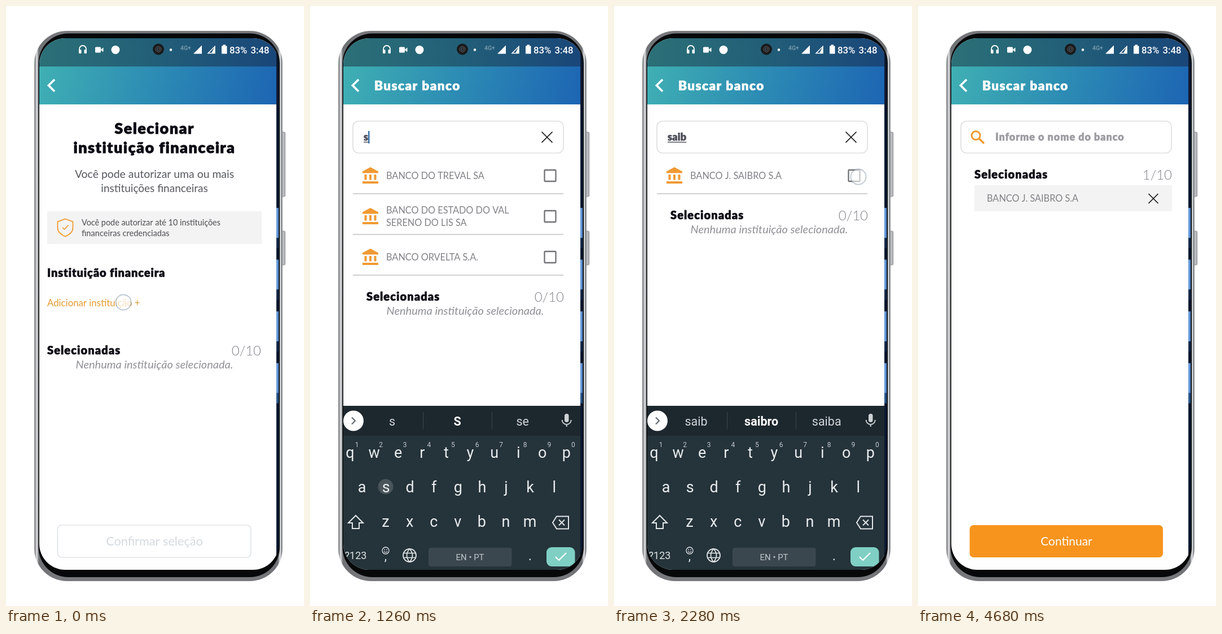
An HTML page with a canvas for the animation above (4710 ms loop, 528 by 1061 pixels).

```html
<!DOCTYPE html>
<html lang="pt">
<head>
<meta charset="utf-8">
<title>Selecionar instituição</title>
<style>
html, body { margin: 0; width: 100%; height: 100%; overflow: hidden; background: #fff; }
canvas { display: block; }
</style>
</head>
<body>
<canvas id="stage" width="528" height="1061"></canvas>
<script>
const ctx = document.getElementById('stage').getContext('2d');
const LOOP = 4710;
const ORANGE = '#f7941d';
const INK = '#0b0b14';
const LATO = 'Lato, "Open Sans", sans-serif';
const ROBOTO = 'Roboto, "Open Sans", sans-serif';
const SLIDE = { start: 300, time: 250, width: 432 };
const KEYS_UP = 830, CLEAR = 3900, KEYS_TIME = 175;
const CHECKED = 2430, ROW_GONE = 2560, LAST_KEY = 1780;

const TYPING = [[1240, 's'], [1440, 'sa'], [1620, 'sai'], [LAST_KEY, 'saib'], [CLEAR, '']];
const HINTS = {
  s: ['s', 'S', 'se'],
  sa: ['sa', 'SA', 'sabe'],
  sai: ['sai', 'saiu', 'saiba'],
  saib: ['saib', 'saibro', 'saiba']
};
const PICK = 'BANCO J. SAIBRO S.A';
const BANKS = [
  ['BANCO DO TREVAL SA'],
  ['BANCO DO ESTADO DO VAL', 'SERENO DO LIS SA'],
  ['BANCO ORVELTA S.A.']
];
// x, y, start, end, fill strength
const TAPS = [
  [208, 524, -120, 280, .7], [350, 235, 660, 960, .5],
  [134, 850, 1180, 1340, .25], [77, 850, 1400, 1640, .25],
  [369, 790, 1570, 1720, .25], [305, 912, 1730, 1890, .25],
  [433, 302, 2160, 2440, .6], [420, 232, 3740, 3960, .6]
];

const clamp = v => Math.max(0, Math.min(1, v));

function text(str, x, y, size, color, o = {}) {
  ctx.font = `${o.style || 'normal'} ${o.weight || 400} ${size}px ${o.font || LATO}`;
  ctx.letterSpacing = (o.gap || 0) + 'px';
  ctx.textAlign = o.align || 'left';
  ctx.fillStyle = color;
  ctx.fillText(str, x, y);
  if (o.weight === 900) {
    ctx.strokeStyle = color;
    ctx.lineWidth = size * .03;
    ctx.lineJoin = 'round';
    ctx.strokeText(str, x, y);
    ctx.lineJoin = 'miter';
  }
  const w = ctx.measureText(str).width;
  ctx.letterSpacing = '0px';
  return w;
}

function rect(x, y, w, h, color) {
  ctx.fillStyle = color;
  ctx.fillRect(x, y, w, h);
}

function box(x, y, w, h, r, fill, stroke, line = 1.2) {
  ctx.beginPath();
  ctx.roundRect(x, y, w, h, r);
  paint(fill, stroke, line);
}

function disc(x, y, r, fill, stroke, line = 1.2) {
  ctx.beginPath();
  ctx.arc(x, y, r, 0, Math.PI * 2);
  paint(fill, stroke, line);
}

function paint(fill, stroke, line) {
  if (fill) { ctx.fillStyle = fill; ctx.fill(); }
  if (stroke) { ctx.strokeStyle = stroke; ctx.lineWidth = line; ctx.stroke(); }
}

function shape(d, x, y, fill, stroke, line = 2) {
  ctx.save();
  ctx.translate(x, y);
  const p = new Path2D(d);
  if (fill) { ctx.fillStyle = fill; ctx.fill(p); }
  if (stroke) { ctx.strokeStyle = stroke; ctx.lineWidth = line; ctx.stroke(p); }
  ctx.restore();
}

function cross(x, y, r) {
  shape(`M${-r} ${-r}L${r} ${r}M${r} ${-r}L${-r} ${r}`, x, y, null, '#111', 1.7);
}

function ramp(x0, y0, x1, y1, ...colors) {
  const g = ctx.createLinearGradient(x0, y0, x1, y1);
  colors.forEach((c, i) => g.addColorStop(i / (colors.length - 1), c));
  return g;
}

function header(title) {
  rect(47, 57, 432, 940, '#fff');
  rect(47, 107, 432, 67, ramp(60, 90, 465, 200, '#40b0b3', '#2c8bb4', '#1d66b3'));
  shape('M6 -10.5L-4.5 0L6 10.5', 80, 140.5, null, '#fff', 3.8);
  if (title) text(title, 114, 149, 22.5, '#fff', { weight: 900, gap: 1.45 });
}

function button(label, size, on) {
  box(91.5, 918, 342.5, 57, 7, on ? ORANGE : null, on ? null : '#d3dae0');
  text(label, 263, 954, size, on ? '#fff' : '#d4dadf', { align: 'center' });
}

function selected(x, right, mid, y, count) {
  text('Selecionadas', x, y + 7, 20, INK, { weight: 900, gap: 1.1 });
  text(count + '/10', right, y + 9, 24, '#7f8288', { weight: 300, align: 'right' });
  if (!count) {
    text('Nenhuma instituição selecionada.', mid, y + 32, 20, '#8f9195',
      { style: 'italic', align: 'center' });
    return;
  }
  rect(x, y + 19, right - x, 46, '#f4f3f3');
  text(PICK, x + 22, y + 48, 16.3, '#808286');
  cross(417, y + 42.5, 8.5);
}

function startPage() {
  header();
  const head = { weight: 900, gap: 1.45, align: 'center' }, mid = { align: 'center' };
  text('Selecionar', 263, 226, 27, INK, head);
  text('instituição financeira', 263, 260, 27, INK, head);
  text('Você pode autorizar uma ou mais', 263, 304, 19.4, '#55585d', mid);
  text('instituições financeiras', 263, 329, 19, '#55585d', mid);
  rect(73, 363, 380, 58, '#f4f3f3');
  shape('M0 -15L13.5 -10V1C13.5 8 7 13 0 16C-7 13 -13.5 8 -13.5 1V-10Z', 105, 391.5, null, '#ee9a30', 1.8);
  shape('M-5 0L-1.5 3.5L5.5 -4', 105, 391.5, null, '#ee9a30', 1.6);
  text('Você pode autorizar até 10 instituições', 134, 388, 14.4, '#4c4e52');
  text('financeiras credenciadas', 134, 407, 14.6, '#4c4e52');
  text('Instituição financeira', 73, 479, 20, INK, { weight: 900, gap: .9 });
  text('Adicionar instituição +', 73, 531, 16.8, '#e39a32');
  selected(73, 452, 263, 609, 0);
  button('Confirmar seleção', 21.7, false);
}

function bankRow(lines, y, checked) {
  shape('M0 -15L14 -7.5V-4.5H-14V-7.5ZM-10.5 -2H-6.5V7.5H-10.5ZM-2 -2H2V7.5H-2ZM6.5 -2H10.5V7.5H6.5ZM-14 10H14V14H-14Z',
    107, y, '#f19a33');
  lines.forEach((s, i) =>
    text(s, 135, y + 6 + (i - (lines.length - 1) / 2) * 22, 16.3, '#808286'));
  box(415.5, y - 10, 20, 20, 1, checked ? ORANGE : null, checked ? ORANGE : '#707276', 2.3);
  if (checked) shape('M-6 0L-2 4L6 -5', 425.5, y, null, '#fff', 2.4);
  rect(76, y + 31.3, 373, 1.3, '#b7b8ba');
}

function searchPage(t, typed) {
  header('Buscar banco');
  box(76, 203.5, 373, 56.5, 10, '#fff', '#cfd1d3');
  let caret = 138;
  if (typed) {
    const w = text(typed, 95, 238, 18, '#4b4d57', { weight: 900, gap: .2 });
    rect(95, 240, w, 1.4, '#4b4d57');
    caret = 96 + w;
    cross(420, 232, 9.5);
  } else {
    disc(102.5, 229, 7.5, null, '#ee9a30', 3);
    shape('M0 0L9 9', 108, 234, null, '#ee9a30', 3.4);
    text('Informe o nome do banco', 137, 238, 18, '#9c9da2', { weight: 900, gap: .95 });
  }
  const blinkOn = t < LAST_KEY || Math.floor((t - LAST_KEY) / 500) % 2 === 0;
  if (t < CLEAR && blinkOn) rect(caret - 1, 221, 2.2, 22, '#1f5f9e');

  const picked = t >= CHECKED;
  let rows = 0;
  if (typed.length > 2) {
    rows = 1;
    if (t < ROW_GONE) bankRow([PICK], 300, picked);
  } else if (typed) {
    rows = 3;
    BANKS.forEach((b, i) => bankRow(b, 300 + i * 72, false));
  }
  selected(100, 450, 275, 298 + rows * 72, picked ? 1 : 0);
  button('Continuar', 20.9, picked);
}

function tools() {
  const c = '#e4e8ea';
  box(123, 725, 18, 18, 3, null, c, 2);
  disc(128.5, 731, 1.3, c);
  disc(135.5, 731, 1.3, c);
  shape('M-5 2Q0 8 5 2', 132, 734, null, c, 1.8);
  text('GIF', 193, 739, 15, c, { weight: 700, font: ROBOTO, gap: 1, align: 'center' });
  for (let i = 0; i < 8; i++) {
    const a = i * Math.PI / 4;
    disc(255 + 7.5 * Math.cos(a), 734 + 7.5 * Math.sin(a), 2.6, c);
  }
  disc(255, 734, 5.5, null, c, 4.5);
  box(307, 724, 14, 15, 2, c);
  box(313, 730, 14, 15, 2, null, c, 1.6);
  text('G', 314, 737, 11, '#7b8488', { weight: 700, font: ROBOTO, align: 'center' });
  rect(353.5, 720, 1, 27, 'rgba(255,255,255,.12)');
  for (let i = -1; i < 2; i++) disc(393 + i * 8, 734, 2.4, c);
}

function keyRow(letters, x, y, digits) {
  [...letters].forEach((k, i) => {
    const cx = x + i * 42.6;
    text(k, cx, y, 27, '#e9edef', { font: ROBOTO, align: 'center' });
    if (digits) text((i + 1) % 10, cx + 12, y - 19, 12, '#c3cace', { font: ROBOTO, align: 'center' });
  });
}

function keyboard(t, typed) {
  const up = t < CLEAR ? clamp((t - KEYS_UP) / KEYS_TIME) : 1 - clamp((t - CLEAR) / KEYS_TIME);
  if (!up) return;
  const c = '#e1e6e8', mid = { font: ROBOTO, align: 'center' };
  ctx.save();
  ctx.translate(0, (1 - up) * 157);
  // the backing fades in, the keys stay solid
  ctx.globalAlpha = Math.min(1, up * 1.35);
  rect(47, 707, 432, 53, '#1d272e');
  rect(47, 760, 432, 400, '#25333a');
  ctx.globalAlpha = 1;

  disc(77, 733.5, 18, '#fff');
  const dir = typed ? 1 : -1;
  shape(`M${-3 * dir} -6L${3 * dir} 0L${-3 * dir} 6`, 77, 733.5, null, '#59636a', 2);
  if (typed) {
    HINTS[typed].forEach((s, i) =>
      text(s, 145.5 + i * 115.6, 741.5, 21.5, i === 1 ? '#fff' : '#d0d6d9', { ...mid, weight: i === 1 ? 700 : 400 }));
    rect(200, 718, 1, 30, '#3c474d');
    rect(322, 718, 1, 30, '#3c474d');
  } else tools();
  box(451, 721, 7.5, 15, 4, '#ccd2d5');
  shape('M-8 -1A8 8 0 0 0 8 -1M0 7V11', 454.7, 733, null, '#ccd2d5', 2);

  keyRow('qwertyuiop', 71, 799, true);
  keyRow('asdfghjkl', 92, 860);
  keyRow('zxcvbnm', 134, 921);
  shape('M0 -12L13 1H6V11H-6V1H-13Z', 81, 913, null, c, 2);
  shape('M-14 0L-7 -11H14V11H-7Z', 444, 913.5, null, c, 2);
  shape('M-3 -5L7 5M7 -5L-3 5', 444, 913.5, null, c, 2);

  text('?123', 81, 978, 18, c, mid);
  disc(134, 963, 6, null, c, 1.3);
  disc(132, 961.5, .9, c);
  disc(136, 961.5, .9, c);
  shape('M-3 1.5Q0 5 3 1.5', 134, 963, null, c, 1.2);
  text(',', 134, 980, 22, c, mid);
  disc(176.5, 971.5, 11.5, null, c, 1.8);
  shape('M-11 -4H11M-11 4H11M0 -11.5Q-10 0 0 11.5M0 -11.5Q10 0 0 11.5', 176.5, 971.5, null, c, 1.6);
  box(210, 958, 147.5, 33, 4, '#3b474e');
  text('EN • PT', 283.5, 980, 15, '#bfc7cb', mid);
  text('.', 390, 980, 24, c, mid);
  box(419, 957, 50.5, 34, 9, '#7fcfc4');
  shape('M-9 0L-3 6L10 -7', 444, 974, null, '#fff', 2.2);
  ctx.restore();
}

function statusBar() {
  rect(55, 55, 424, 52, ramp(60, 60, 470, 105, '#2c7077', '#225f78', '#1a4779'));
  shape('M-6 4V0A6 6 0 0 1 6 0V4', 136, 76, null, '#fff', 1.8);
  box(129, 77, 4.5, 7, 1.5, '#fff');
  box(138.5, 77, 4.5, 7, 1.5, '#fff');
  box(158, 72.5, 10, 10, 1.5, '#fff');
  shape('M0 0L5 -4V4Z', 167.5, 77.5, '#fff');
  disc(194, 77.5, 7.5, '#fff');
  disc(270, 76.5, 10, '#191b1d');
  disc(270, 76.5, 5, '#292b2d', '#55585b', 1);
  disc(270, 76.5, 2, '#0b0c0e', '#77797c', .8);
  disc(292, 77.5, 2.2, '#fff');
  text('4G+', 309, 78, 10.5, '#7e9fb2', { font: ROBOTO, weight: 500 });
  shape('M0 0H15V-15Z', 332, 84.5, '#fff');
  shape('M0 0H12V-12Z', 358, 83.5, null, '#fff', 1.5);
  shape('M6 0H12V-12Z', 358, 83.5, '#fff');
  box(382, 70.5, 9.5, 14, 1, '#fff');
  rect(384.5, 68.5, 4.5, 3, '#fff');
  text('83%', 396, 84, 16.8, '#fff', { font: ROBOTO, weight: 500 });
  text('3:48', 466.5, 84, 16.8, '#fff', { font: ROBOTO, weight: 500, align: 'right' });
}

function metal() {
  const g = ctx.createLinearGradient(50, 0, 490, 0);
  const stops = [[0, '#a4a6a9'], [.004, '#7c7e81'], [.008, '#d3d5d8'], [.013, '#c4c6c9'], [.018, '#6f7174'], [.1, '#77797c']];
  for (const [p, c] of stops) {
    g.addColorStop(p, c);
    g.addColorStop(1 - p, c);
  }
  return g;
}

function phoneBody() {
  rect(0, 0, 528, 1061, '#fff');
  box(487, 223, 7.5, 114, 2, '#b9bbbe', '#85878a', 1);
  box(487, 398, 7.5, 60, 2, '#b9bbbe', '#85878a', 1);
  box(50, 44, 440, 973, 58, metal());
  box(57.5, 48.5, 427.5, 961.5, 53, '#07080a');
}

function curvedEdge() {
  rect(479, 55, 6, 945, '#0c1930');
  for (let i = 0; i < 4; i++) {
    const y = 357 + i * 91.5;
    rect(479, y, 4, 53, '#5f95d8');
    rect(479, y + 53, 4, 18, i < 3 ? '#16294a' : '#2a5688');
  }
}

function taps(t) {
  for (const [x, y, a, b, fill] of TAPS) {
    if (t < a || t > b) continue;
    ctx.globalAlpha = Math.min(1, (t - a) / 60, (b - t) / 120);
    const onKeys = y > 700;
    disc(x, y, 13.5, `rgba(255,255,255,${fill})`, onKeys ? null : 'rgba(130,145,165,.5)', 1.8);
    ctx.globalAlpha = 1;
  }
}

function draw(t) {
  let typed = '';
  for (const [at, s] of TYPING) if (t >= at) typed = s;
  const left = 1 - clamp((t - SLIDE.start) / SLIDE.time);
  const dx = SLIDE.width * left * left;

  phoneBody();
  ctx.save();
  ctx.beginPath();
  ctx.roundRect(59, 57, 424.5, 940, 46);
  ctx.clip();
  if (dx > 0) startPage();
  if (dx < SLIDE.width) {
    ctx.save();
    ctx.translate(dx, 0);
    searchPage(t, typed);
    ctx.restore();
  }
  keyboard(t, typed);
  statusBar();
  taps(t);
  curvedEdge();
  ctx.restore();
}

const begin = performance.now();
function tick() {
  draw((performance.now() - begin) % LOOP);
  requestAnimationFrame(tick);
}
tick();
</script>
</body>
</html>
```
